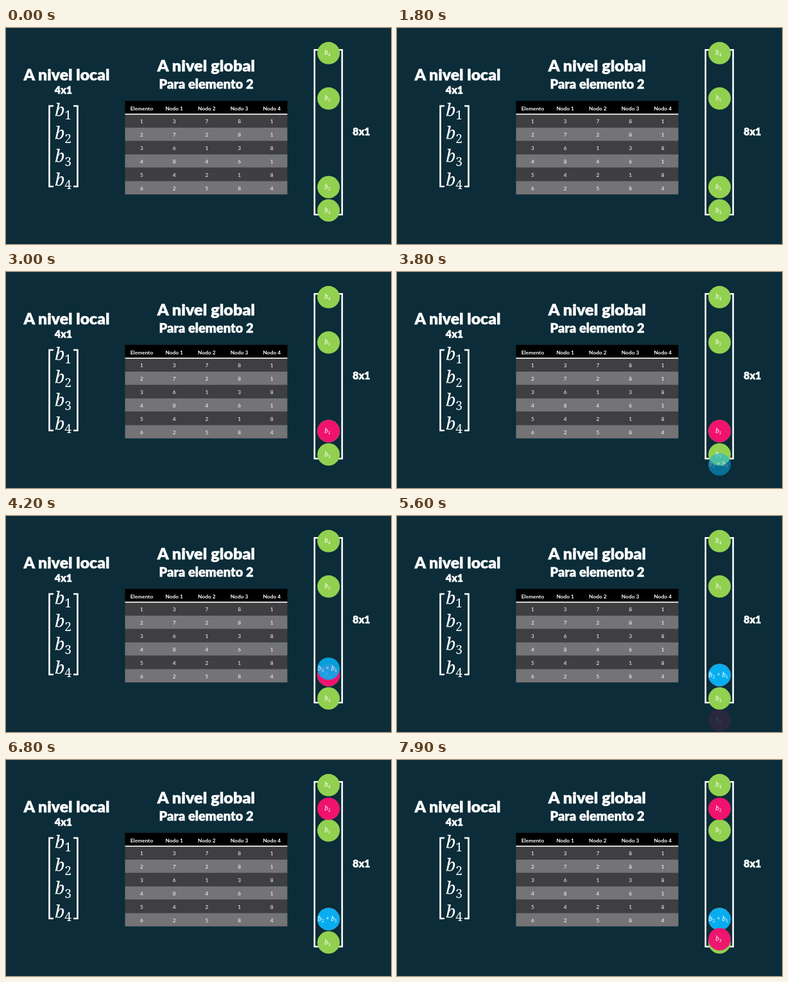
An HTML page for the animation above (8000 ms loop, 600 px wide and 338 px high).

```html
<!DOCTYPE html>
<html lang="es">
<head>
<meta charset="utf-8">
<style>
  html, body { margin: 0; width: 100%; height: 100%; overflow: hidden; background: #0b2c38; }
  svg { display: block; width: 600px; height: 338px; }
  text { fill: #fff; text-anchor: middle; }
  .title { font-family: Lato, sans-serif; font-weight: 900; stroke: #fff; stroke-width: 0.5; }
  .cell { font: 8.4px Lato, sans-serif; }
  .head { font-weight: 700; }
  .math { font-family: "Noto Serif", "Liberation Serif", serif; font-style: italic; }
  .sub { font-style: normal; }
  .bracket { fill: none; stroke: #fff; stroke-width: 2.6; }
</style>
</head>
<body>
<svg id="stage" viewBox="0 0 600 338"></svg>
<script>
const LOOP = 8000, HEIGHT = 338, DURATION = 1100;
const GREEN = '#92d050', PINK = '#f0126f', BLUE = '#06aeef';
const CX = 502.7;
const stage = document.getElementById('stage');

const title = (x, y, size, s) =>
  `<text class="title" x="${x}" y="${y}" font-size="${size}">${s}</text>`;

const cell = (x, y, s, cls = '') =>
  `<text class="cell ${cls}" x="${x}" y="${y}">${s}</text>`;

const rect = (y, h, fill) =>
  `<rect x="185.5" y="${y}" width="253" height="${h}" fill="${fill}"/>`;

const bracket = (left, right, top, bottom, tick) =>
  `<path class="bracket" d="M${left + tick} ${top}H${left}V${bottom}h${tick}
    M${right - tick} ${top}H${right}V${bottom}h${-tick}"/>`;

// Terms such as "b1" or "b2+b1", with lowered indices
function math(x, y, size, s) {
  const drop = size * 0.2;
  const terms = s.split('+').map(t =>
    `${t[0]}<tspan class="sub" font-size="${size * 0.7}" dy="${drop}">${t[1]}</tspan>`);
  const plus = `<tspan class="sub" dy="${-drop}"> + </tspan>`;
  return `<text class="math" x="${x}" y="${y}" font-size="${size}">${terms.join(plus)}</text>`;
}

const ball = (y, color, s) =>
  `<g><circle cx="${CX}" cy="${y}" r="17.5" fill="${color}"/>${math(CX - 1.7, y + 3, 10, s)}</g>`;

function table() {
  const rows = ['13781', '27281', '36138', '48461', '54218', '62584'];
  const colX = i => 211.5 + i * 50.7;
  let out = rect(114, 20.5, '#000');
  ['Elemento', 'Nodo 1', 'Nodo 2', 'Nodo 3', 'Nodo 4']
    .forEach((s, i) => out += cell(colX(i), 128.5, s, 'head'));
  rows.forEach((row, r) => {
    const y = 135 + r * 20.9;
    out += rect(y, 20.9, r % 2 ? '#747376' : '#3f3e40');
    [...row].forEach((d, i) => out += cell(colX(i), y + 14, d));
  });
  return out + rect(134, 1.6, '#fff');
}

// Arrivals: resting height, colour, label, start time, motion
const arrivals = [
  { y: 249, color: PINK, label: 'b1', start: 1800, move: descend },
  { y: 249, color: BLUE, label: 'b2+b1', start: 3230, move: riseUp },
  { y: 76.4, color: PINK, label: 'b2', start: 5456, move: riseUp },
  { y: 285.5, color: PINK, label: 'b3', start: 6833, move: riseUp }
];

// Both motions return an offset in stage heights
function descend(p) { return -0.1 * (1 - p); }

// Decelerates past the goal, then drops back onto it
function riseUp(p) {
  if (p < 0.9) return 1.03 * (1 - p / 0.9) ** 2 - 0.03;
  return -0.03 * (1 - ((p - 0.9) / 0.1) ** 2);
}

stage.innerHTML =
  title(94.5, 82, 24.8, 'A nivel local') +
  title(89.5, 102.5, 16, '4x1') +
  title(312, 68, 25.3, 'A nivel global') +
  title(312, 94.5, 20.1, 'Para elemento 2') +
  title(554, 168, 16, '8x1') +
  table() +
  bracket(67.5, 111.5, 122, 248, 6.5) +
  [1, 2, 3, 4].map(i => math(89, 101.5 + i * 36.3, 27.5, 'b' + i)).join('') +
  bracket(480.8, 523.8, 34.2, 292, 7) +
  ball(39.3, GREEN, 'b4') + ball(110.3, GREEN, 'b1') +
  ball(249, GREEN, 'b2') + ball(285.5, GREEN, 'b3') +
  '<g id="moving">' + arrivals.map(a => ball(a.y, a.color, a.label)).join('') + '</g>';

const groups = document.getElementById('moving').children;
const origin = performance.now();

function draw() {
  const t = (performance.now() - origin) % LOOP;
  arrivals.forEach((a, i) => {
    const p = Math.min(1, Math.max(0, (t - a.start) / DURATION));
    groups[i].setAttribute('transform', `translate(0 ${a.move(p) * HEIGHT})`);
    groups[i].setAttribute('opacity', p);
  });
  requestAnimationFrame(draw);
}
draw();
</script>
</body>
</html>
```
